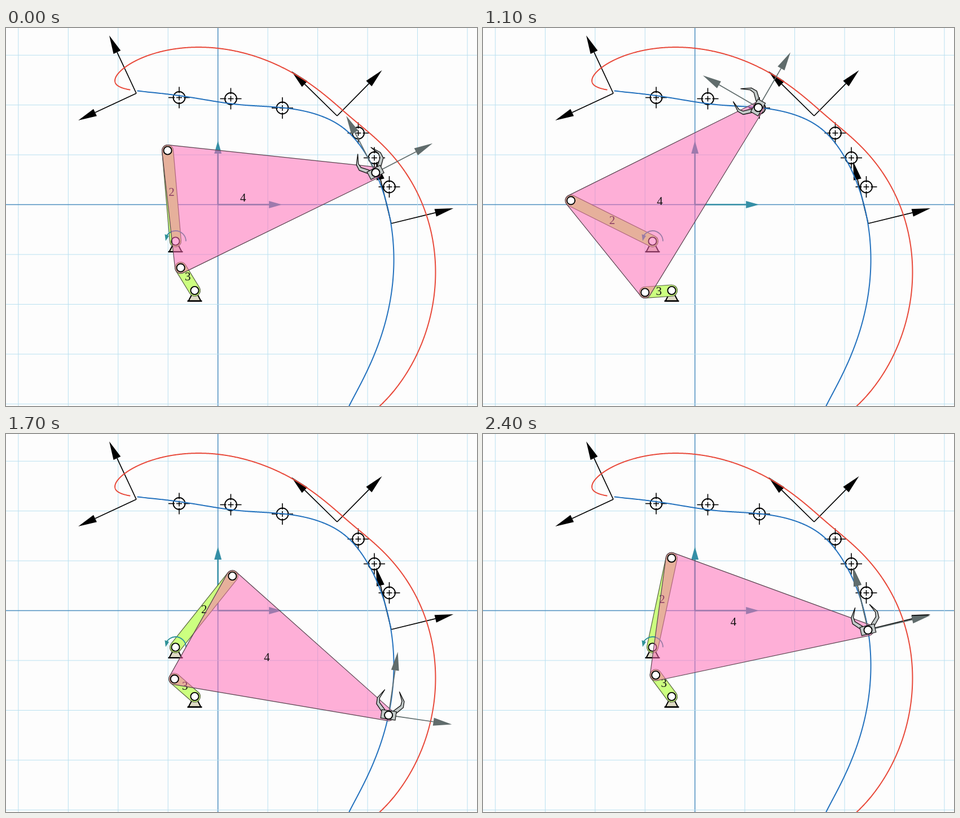
Animation of 835x671 px, one loop 2500 ms. Source, as an HTML page with a canvas:

```html
<!DOCTYPE html>
<html>
<head>
<meta charset="utf-8">
<style>
html, body { margin: 0; width: 100%; height: 100%; overflow: hidden; background: #fdfdfd; }
canvas { display: block; }
</style>
</head>
<body>
<canvas id="stage" width="835" height="671"></canvas>
<script>
const ctx = document.getElementById('stage').getContext('2d');
const RAD = Math.PI / 180, QUARTER = Math.PI / 2;
const CRANK = 161.6, COUPLER = 209.4, ROCKER = 47.4;
const A = [300.5, 378.5], D = [334.5, 466], ORIGIN = [375.7, 313.6];
const UNIT = 88.45, STEPS = 25;
const HIGH = 217.8, LOW = 5.1, TURN = 7.22; // crank range in degrees, step of the upper turn
const TEAL = '#358fa6', GREY = '#606c6c', STEEL = '#c3cac9';

const polar = ([x, y], r, a) => [x + r * Math.cos(a), y + r * Math.sin(a)];
const mid = (p, q) => [(p[0] + q[0]) / 2, (p[1] + q[1]) / 2];
const angle = (p, q) => Math.atan2(q[1] - p[1], q[0] - p[0]);

// Four-bar linkage: crank angle and assembly branch -> joint positions
function solve(deg, branch = 1) {
  const B = polar(A, CRANK, -deg * RAD);
  const d = Math.hypot(D[0] - B[0], D[1] - B[1]);
  const cos = (COUPLER ** 2 + d * d - ROCKER ** 2) / (2 * COUPLER * d);
  const u = angle(B, D) + branch * Math.acos(Math.min(1, cos));
  const C = polar(B, COUPLER, u);
  const P = polar(polar(B, 79.7, u), 362.2, u - QUARTER);
  return { B, C, P, heading: u - 111 * RAD };
}

function couplerCurve(branch) {
  const points = [];
  for (let deg = HIGH; deg > LOW; deg -= 0.2) points.push(solve(deg, branch).P);
  return points;
}

function stroke(color, width) {
  ctx.strokeStyle = color;
  ctx.lineWidth = width;
  ctx.stroke();
}

function line(points, color, width) {
  ctx.beginPath();
  points.forEach(p => ctx.lineTo(...p));
  stroke(color, width);
}

function shape(points, fill, color, width) {
  ctx.beginPath();
  points.forEach(p => ctx.lineTo(...p));
  ctx.closePath();
  ctx.fillStyle = fill;
  ctx.fill();
  if (color) stroke(color, width);
}

function disc(p, r, fill, width) {
  ctx.beginPath();
  ctx.arc(...p, r, 0, 4 * QUARTER);
  ctx.fillStyle = fill;
  ctx.fill();
  stroke('#000', width);
}

const joint = p => disc(p, 7.1, '#fff', 1.9);

function arrow(p, length, a, color, width, head, half) {
  const tip = polar(p, length, a), base = polar(tip, -head, a);
  line([p, base], color, width);
  shape([tip, polar(base, half, a + QUARTER), polar(base, half, a - QUARTER)], color);
}

function axes(p, heading, color, width = 1.7, head = 33, half = 7) {
  for (const a of [heading, heading - QUARTER]) arrow(p, 113.5, a, color, width, head, half);
}

// Outline around equal discs, corners given clockwise on screen
function hull(corners, fill, color) {
  const n = corners.length;
  ctx.beginPath();
  corners.forEach((p, i) => {
    const a = angle(corners[(i + n - 1) % n], p), b = angle(p, corners[(i + 1) % n]);
    ctx.arc(...p, 10, a - QUARTER, b - QUARTER);
  });
  ctx.closePath();
  ctx.fillStyle = fill;
  ctx.fill();
  stroke(color, 1.2);
}

function label(text, x, y) {
  ctx.fillStyle = '#111';
  ctx.fillText(text, x, y + 6.5);
}

function ground([x, y]) {
  shape([[x - 4, y + 5], [x + 4, y + 5], [x + 11, y + 18.5], [x - 11, y + 18.5]], '#ddd9c4', '#000', 2);
  line([[x - 13, y + 18.7], [x + 13, y + 18.7]], '#000', 2.4);
}

function link(p, q, text) {
  hull([p, q], '#ccff80', '#56633f');
  const [x, y] = mid(p, q), s = Math.sin(angle(p, q)) ** 2;
  label(text, x + 1 - s, y - 6.5 * s);
}

function target([x, y]) {
  disc([x, y], 10.5, 'transparent', 1.9);
  for (const [a, b] of [[-19, -8], [-5, 5], [8, 19]]) {
    line([[x + a, y], [x + b, y]], '#000', 1.6);
    line([[x, y + a], [x, y + b]], '#000', 1.6);
  }
}

function gripper(P, heading) {
  ctx.save();
  ctx.translate(...P);
  ctx.rotate(heading);
  for (const side of [-1, 1]) {
    ctx.save();
    ctx.scale(side, -1);
    shape([[13, 5], [24, 17], [24, 28], [13, 44], [20, 28], [19, 20], [8, 9]], STEEL, '#111', 1.3);
    ctx.restore();
  }
  shape([[-13, -8], [13, -8], [13, 7], [-13, 7]], STEEL, '#222', 1.3);
  ctx.restore();
  joint(P);
}

const targets = [[307, 123.5], [398.5, 125.5], [490, 142], [624.5, 186.5], [653, 230.5], [679.5, 282]];
const poses = [[231, 116, -115], [587, 156, -45.5], [683, 347, -13.7]];
const reached = couplerCurve(1), unreached = couplerCurve(-1);

function scenery() {
  ctx.fillStyle = '#fdfdfd';
  ctx.fillRect(0, 0, 835, 671);
  for (let i = -4; i <= 5; i++) {
    const x = ORIGIN[0] + i * UNIT, y = ORIGIN[1] + i * UNIT;
    const style = i ? ['#b9e0f0', 1] : ['#4d8fc0', 1.5];
    line([[x, 0], [x, 671]], ...style);
    line([[0, y], [835, y]], ...style);
  }
  for (const [x, y, deg] of poses) axes([x, y], deg * RAD, '#000');
  targets.forEach(target);
  line(unreached, '#e8493a', 2);
  line(reached, '#2472be', 2);
  axes(ORIGIN, 0, TEAL, 2.5, 23, 6.5);
}

function motor() {
  ctx.beginPath();
  ctx.arc(...A, 18.5, 0, -155 * RAD, true);
  stroke('#2f9298', 1.8);
  shape([[283, 378], [281.5, 366], [289, 369]], '#2f9298');
}

// The crank swings back and forth at constant speed
function crankAngle(step) {
  const half = STEPS / 2;
  const away = Math.abs((step - TURN + half + STEPS) % STEPS - half);
  return HIGH - (HIGH - LOW) * away / half;
}

function draw(step) {
  const { B, C, P, heading } = solve(crankAngle(step));
  scenery();
  ground(A);
  ground(D);
  link(B, A, '2');
  link(C, D, '3');
  motor();
  joint(A);
  joint(D);
  hull([B, P, C], 'rgba(255,105,180,.52)', '#5a4450');
  joint(B);
  joint(C);
  label('4', (B[0] + C[0] + P[0]) / 3 + 3, (B[1] + C[1] + P[1]) / 3 + 1.5);
  axes(P, heading, GREY);
  gripper(P, heading);
}

ctx.font = '21px "Liberation Serif", serif';
ctx.textAlign = 'center';
const start = performance.now();
function tick() {
  draw(Math.floor((performance.now() - start) / 100) % STEPS);
  requestAnimationFrame(tick);
}
tick();
</script>
</body>
</html>
```
